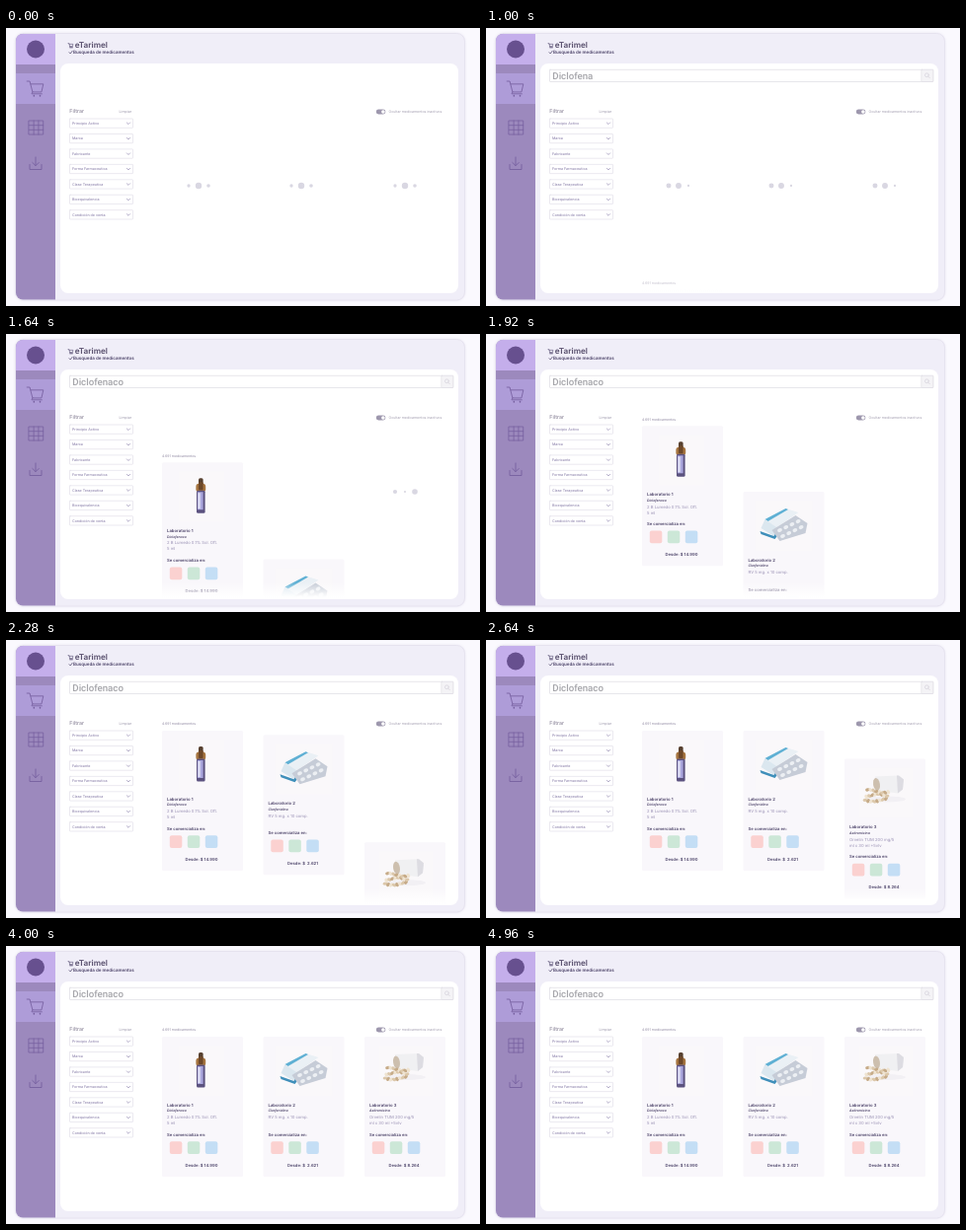
An HTML page with a canvas for the animation above (5 s loop, 480x282 px).

```html
<!DOCTYPE html>
<html lang="es">
<head>
<meta charset="utf-8">
<title>Busqueda de medicamentos</title>
<style>
html, body { margin: 0; width: 100%; height: 100%; overflow: hidden; background: #faf9fe; }
canvas { display: block; width: 480px; height: 282px; }
</style>
</head>
<body>
<canvas id="stage"></canvas>
<script>
const W = 480, H = 282, LOOP = 5000;
const SANS = 'Inter, "Open Sans", sans-serif';
const canvas = document.getElementById('stage');
const ctx = canvas.getContext('2d');
const dpr = window.devicePixelRatio || 1;
canvas.width = W * dpr;
canvas.height = H * dpr;
ctx.textRendering = 'geometricPrecision';

const INK = '#4b4268', SOFT = '#9990b4', ICON = '#7760a0';
const FILTERS = ['Principio Activo', 'Marca', 'Fabricante', 'Forma Farmaceutica',
  'Clase Terapeutica', 'Bioequivalencia', 'Condición de venta'];
const CARDS = [
  { x: 158, start: 865, drug: 'Diclofenaco', lines: ['2 B Lumedo 0.1% Sol. Oft.', '5 ml'], price: '14.990', photo: bottle },
  { x: 260.5, start: 1275, drug: 'Clorfenidino', lines: ['RV 5 mg. x 10 comp.'], price: ' 2.621', photo: blister },
  { x: 363, start: 1815, drug: 'Azitromicina', lines: ['Orvelin TUM 200 mg/5', 'ml x 30 ml +5vlv'], price: '8.264', photo: pills }
];
const DOTS = [{ x: 195, out: 1040 }, { x: 299, out: 1380 }, { x: 404, out: 1720 }];
const QUERY = 'Diclofenaco';
const RISE = 180, RISE_MS = 1115;

const clamp = v => Math.min(1, Math.max(0, v));
const ramp = (t, from, ms) => clamp((t - from) / ms);
const riseOffset = (t, start) => RISE * (1 + Math.cos(Math.PI * ramp(t, start, RISE_MS))) / 2;

function box(x, y, w, h, r, fill, stroke, lw = 0.6) {
  ctx.beginPath();
  ctx.roundRect(x, y, w, h, r);
  if (fill) { ctx.fillStyle = fill; ctx.fill(); }
  if (stroke) { ctx.strokeStyle = stroke; ctx.lineWidth = lw; ctx.stroke(); }
}

function text(str, x, y, size, color, weight = 400, align = 'left', family = SANS) {
  ctx.font = `${weight} ${size}px ${family}`;
  ctx.textAlign = align;
  ctx.textBaseline = 'middle';
  ctx.fillStyle = color;
  ctx.fillText(str, x, y);
}

function poly(points, fill) {
  ctx.beginPath();
  points.forEach(([x, y]) => ctx.lineTo(x, y));
  ctx.closePath();
  ctx.fillStyle = fill;
  ctx.fill();
}

function stroke(path, color, lw) {
  ctx.strokeStyle = color;
  ctx.lineWidth = lw;
  ctx.lineCap = ctx.lineJoin = 'round';
  ctx.stroke(new Path2D(path));
}

function oval(x, y, rx, ry, fill, angle = 0) {
  ctx.beginPath();
  ctx.ellipse(x, y, rx, ry, angle, 0, Math.PI * 2);
  ctx.fillStyle = fill;
  ctx.fill();
}

function cart(x, y, scale, color, lw) {
  ctx.save();
  ctx.translate(x, y);
  ctx.scale(scale, scale);
  stroke('M0 0H3L6 11.5H15.5L17.5 3H4M6 11.5L5 13.5H16', color, lw);
  stroke('M7.5 15.3v.5M14 15.3v.5', color, lw * 1.8);
  ctx.restore();
}

function frameAndSidebar() {
  ctx.fillStyle = '#faf9fe';
  ctx.fillRect(0, 0, W, H);
  ctx.save();
  ctx.shadowColor = 'rgba(110,95,150,.18)';
  ctx.shadowBlur = 3 * dpr;
  box(9.5, 5.5, 455, 270.5, 8, '#f0eef8');
  ctx.restore();
  box(9.5, 5.5, 455, 270.5, 8, null, '#e3e0ed', 0.7);

  ctx.save();
  ctx.beginPath();
  ctx.roundRect(10, 6, 40, 269.5, [7, 0, 0, 7]);
  ctx.clip();
  ctx.fillStyle = '#9c89bd';
  ctx.fillRect(10, 6, 40, 270);
  ctx.fillStyle = '#c4aeeb';
  ctx.fillRect(10, 6, 40, 31);
  ctx.fillStyle = '#ae9cd8';
  ctx.fillRect(10, 46, 40, 31);
  ctx.restore();

  oval(30, 21.5, 9, 9, '#67508f');
  cart(21.2, 54, 0.95, ICON, 0.9);
  stroke('M23.3 94H37.7V108H23.3ZM28.1 94V108M32.9 94V108M23.3 98.7H37.7M23.3 103.3H37.7', ICON, 0.8);
  stroke('M30 131V139.5M26.8 136.5L30 139.7L33.2 136.5M24 138.5V143.5H36V138.5', ICON, 0.9);

  box(55, 36, 403, 233, 8, '#fff');
}

function header() {
  cart(63, 15.5, 0.28, INK, 2);
  text('eTarimel', 69.7, 17.3, 8.1, '#554c6a', 600);
  stroke('M64 24.7L65.2 26L67.2 23.3', INK, 0.7);
  text('Busqueda de medicamentos', 68, 24.6, 4.5, INK, 600);
}

function filters() {
  text('Filtrar', 64.3, 84.7, 5.3, '#918b9e', 500);
  text('Limpiar', 127, 85.2, 3.6, '#9b95aa', 400, 'right');
  FILTERS.forEach((name, i) => {
    const y = 92 + i * 15.45;
    box(64.5, y, 64, 9.3, 0.5, '#fff', '#dedbe6');
    text(name, 67, y + 4.9, 3.65, '#9389b0', 500);
    stroke(`M122.4 ${y + 4}l1.6 1.6l1.6 -1.6`, '#9389b0', 0.7);
  });
  box(374.8, 82.6, 9.6, 4.9, 2.45, '#9d97ad');
  oval(381.9, 85.05, 1.8, 1.8, '#fff');
  text('Ocultar medicamentos inactivos', 387.5, 85.2, 3.55, '#a19bae');
}

function searchBar(t) {
  ctx.save();
  ctx.globalAlpha = ramp(t, 40, 440);
  box(64.5, 42.3, 388.3, 12.2, 0.5, '#fff', '#dddbe2', 0.7);
  box(440.8, 42.3, 12, 12.2, 0.5, '#f4f3f6', '#dddbe2', 0.6);
  ctx.beginPath();
  ctx.arc(446.4, 47.8, 1.9, 0, Math.PI * 2);
  ctx.strokeStyle = '#cfccd5';
  ctx.lineWidth = 0.6;
  ctx.stroke();
  stroke('M447.8 49.2L449.3 50.7', '#cfccd5', 0.6);
  ctx.restore();
  const count = Math.max(0, Math.ceil((t - 500) / 62));
  text(QUERY.slice(0, count), 67.3, 48.7, 9.7, '#a5a5aa', 500, 'left', 'Roboto, sans-serif');
}

function loaders(t) {
  const phase = (5 + t * 0.3143) * Math.PI / 180;
  const step = 110 * Math.PI / 180;
  for (const { x, out } of DOTS) {
    ctx.globalAlpha = 1 - ramp(t, out, 180);
    for (let i = -1; i <= 1; i++) {
      const r = 2.1 + 1.1 * Math.cos(phase - i * step);
      oval(x + i * 10, 160, r, r, '#d9d7e2');
    }
  }
  ctx.globalAlpha = 1;
}

// Photos are drawn relative to the card's top left corner.
function bottle() {
  box(17, 9, 46, 51, 0, '#faf8fa');
  box(37, 16, 4.6, 7, 1.5, '#57402f');
  box(34.4, 21.5, 9.8, 8.5, 3, '#a5743f');
  box(37, 20, 4.6, 8, 1, '#6d482a');
  box(35, 28.5, 8.6, 23, 1.5, '#5b527f');
  box(36, 30, 5.6, 18, 0, '#aaa6dc');
  box(36.4, 31, 2.4, 16, 0, '#dddcf2');
}

function blister() {
  box(12, 9, 58, 51, 0, '#faf8fa');
  poly([[22, 28], [43, 17], [56, 21], [34, 36]], '#eaf0f5');
  poly([[22, 28], [43, 17], [45.5, 18], [25, 30]], '#5fb0d4');
  poly([[18, 37], [22, 28], [34, 36], [31, 45]], '#dbe7ef');
  poly([[17, 40], [31, 45], [34, 40], [36, 43], [32, 48], [18, 43]], '#3f8fba');
  poly([[29, 39], [53, 24], [65, 32], [63, 42], [37, 50]], '#c6ccd7');
  for (let row = 0; row < 2; row++) {
    for (let i = 0; i < 4; i++) {
      oval(37 + i * 6.2 + row * 3, 39 - i * 3 + row * 6, 2.5, 1.9, '#eceff3', -0.4);
    }
  }
}

function pills() {
  box(15, 9, 54, 51, 0, '#faf8fa');
  oval(42, 41, 20, 3, '#f2f0f4');
  poly([[31, 18], [55, 17], [60, 21], [59, 31], [54, 35], [32, 32]], '#f0f0f2');
  poly([[53, 17], [55, 17], [60, 21], [59, 31], [54, 35]], '#dddce2');
  oval(32.5, 26, 3.4, 6.5, '#cdbfae', -0.15);
  const tones = ['#dcc8ab', '#c6ab88', '#efe3d0'];
  for (let i = 0; i < 24; i++) {
    const row = i % 3, col = Math.floor(i / 3);
    oval(21 + col * 3 + row * 1.2, 42 - row * 4.5 + Math.sin(i * 2.3) * 1.5,
      2.3, 1.6, tones[(i * 2 + col) % 3], Math.sin(i * 1.7));
  }
}

function card(item, index, t) {
  if (t < item.start) return;
  ctx.save();
  ctx.translate(item.x, 92 + riseOffset(t, item.start));
  if (index === 0) text('4.691 medicamentos', 0, -6.6, 3.5, '#9089a2');
  box(0, 0, 82, 142, 1.5, '#f9f7fb');
  item.photo();
  text('Laboratorio ' + (index + 1), 5, 69.3, 4.25, INK, 600);
  text(item.drug, 5, 75.3, 3.4, INK, 'italic 600');
  item.lines.forEach((line, i) => text(line, 5, 82 + i * 6, 4.2, SOFT));
  text('Se comercializa en:', 5, 99.7, 4.2, INK, 600);
  ['#fbd1d0', '#cce7d7', '#c4def5'].forEach((c, i) => box(7.8 + i * 18, 106.3, 12.5, 12.7, 2, c));
  text('Desde: $ ' + item.price, 40, 130.5, 4.2, INK, 600, 'center');
  ctx.restore();
}

function results(t) {
  ctx.save();
  ctx.beginPath();
  ctx.rect(140, 57, 316, 210);
  ctx.clip();
  loaders(t);
  CARDS.forEach((item, i) => card(item, i, t));
  const fade = ctx.createLinearGradient(0, 252, 0, 267);
  fade.addColorStop(0, 'rgba(255,255,255,0)');
  fade.addColorStop(1, '#fff');
  ctx.fillStyle = fade;
  ctx.fillRect(140, 252, 316, 16);
  ctx.restore();
}

function draw(t) {
  ctx.setTransform(dpr, 0, 0, dpr, 0, 0);
  frameAndSidebar();
  header();
  results(t);
  filters();
  searchBar(t);
}

let origin;
function tick(now) {
  origin ??= now;
  draw((now - origin) % LOOP);
  requestAnimationFrame(tick);
}
draw(0);
requestAnimationFrame(tick);
</script>
</body>
</html>
```
